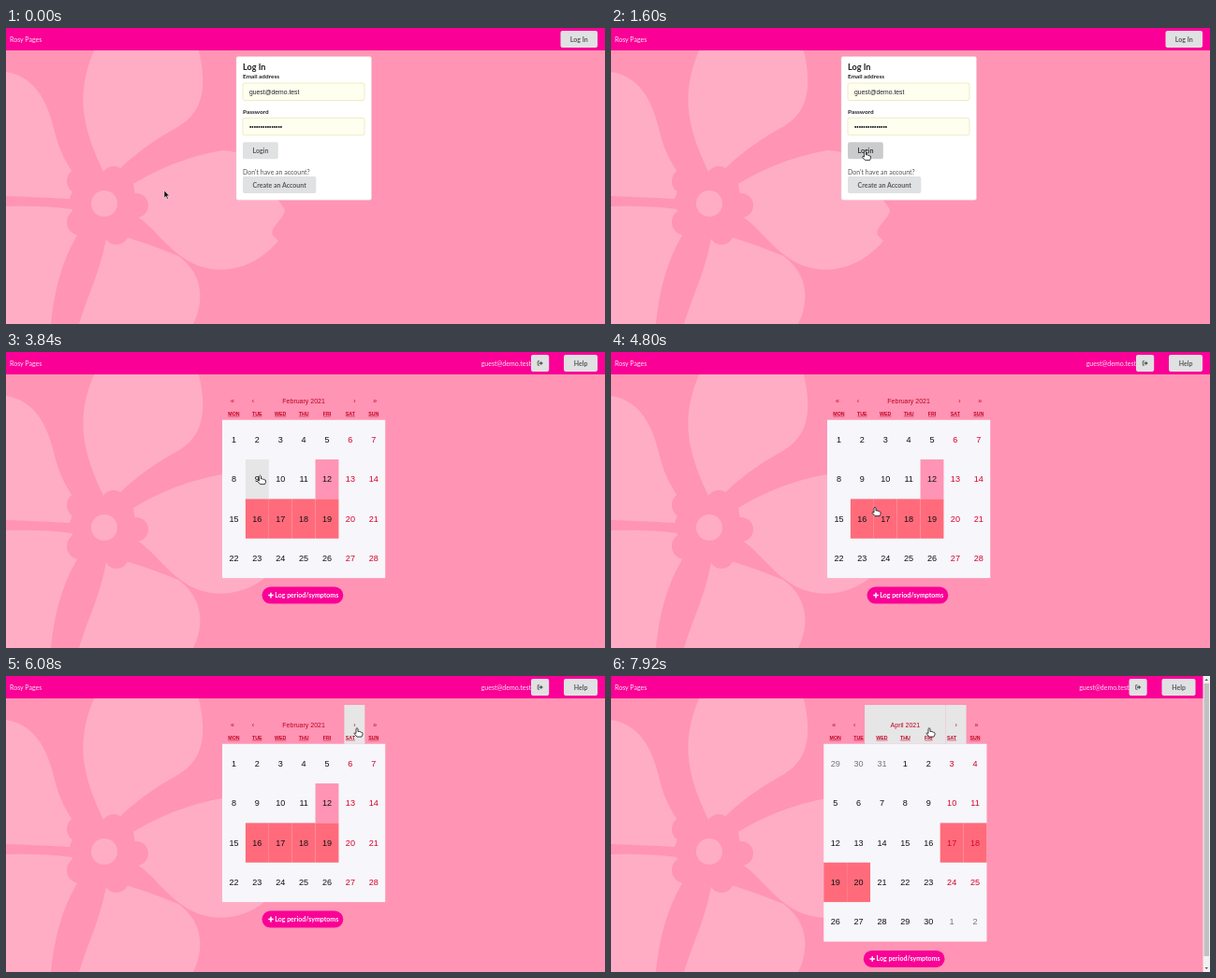
Write an HTML page that moves like this. It is 640x317 px and loops after 8000 ms.

```html
<!DOCTYPE html>
<html lang="en">
<head>
<meta charset="utf-8">
<title>Calendar login</title>
<style>
html, body { margin: 0; width: 100%; height: 100%; overflow: hidden; background: #ff94b4; }
svg { display: block; width: 640px; height: 317px; font: 7px Lato, sans-serif; }
.arial { font-family: "Liberation Sans", Arial, sans-serif; }
.bold { font-weight: 700; }
.mid { text-anchor: middle; }
.field { fill: #fffff0; stroke: #e5dfa1; stroke-width: .6; }
</style>
</head>
<body>
<svg viewBox="0 0 640 317">
  <g fill="#ffadc5">
    <path d="M105 156C86 115 70 75 96 20H205C218 72 206 94 180 108Q145 127 116 156Z"/>
    <path d="M0 47C34 52 46 84 53 115Q59 139 76 161L68 183Q30 181 0 180Z"/>
    <path d="M0 191Q40 190 70 194L82 213C63 240 52 275 48 317H0Z"/>
    <path d="M107 225C101 260 87 287 78 317H200C216 284 204 258 184 244Q155 232 122 222Z"/>
    <path d="M136 167Q180 140 231 131Q272 132 286 180Q297 190 298 196C295 206 281 215 285 222L291 228C262 262 222 266 194 249C173 237 159 215 142 203Z"/>
  </g>
  <g fill="#ff94b4">
    <circle cx="104" cy="188" r="31"/>
    <circle cx="115" cy="161" r="13"/><circle cx="79" cy="164" r="14"/>
    <circle cx="79" cy="208" r="14"/><circle cx="118" cy="219" r="13"/>
    <circle cx="139" cy="190" r="13"/>
  </g>
  <circle cx="105" cy="188" r="14" fill="#ffadc5"/>
  <rect width="640" height="24" fill="#fa0096"/>
  <text x="4" y="14.6" fill="#ffe6f4">Rosy Pages</text>
  <g id="scene"></g>
</svg>
<script>
const LOOP = 8000, STEP = 80, SHOW_CALENDAR = 3840, TO_MARCH = 6640, TO_APRIL = 7520;
const EMAIL = 'guest@demo.test', GREY = '#e0e1e2', PINK = '#fa0096', HOVER = '#e6e6e6';
const TILE_W = 24.89, TILE_H = 42.35, HEAD_RED = '#c00020';
const scene = document.getElementById('scene');

// Pointer tip: time, x, y
const route = [
  [800, 169, 174], [960, 196, 176], [1120, 242, 172], [1280, 265, 165],
  [1440, 270, 146], [1600, 271.5, 132],
  [4560, 271.5, 132], [4720, 275, 152], [4880, 289, 180], [5040, 315, 184],
  [5200, 340, 160], [5280, 344.5, 150], [5440, 355, 149.5],
  [5600, 362, 132], [5840, 372, 83], [6080, 375, 55.5],
  [7760, 375, 55.5], [7840, 355, 55], [7920, 340, 55.5]
];
const february = { name: 'February 2021', lead: 0, days: 28, rows: 4, hot: [15, 18], fertile: 11 };
const march = { name: 'March 2021', lead: 0, days: 31, rows: 5, hot: [17, 20] };
const april = { name: 'April 2021', lead: 3, days: 30, rows: 5, hot: [19, 22] };

const rect = (x, y, w, h, fill, r = 0, extra = '') =>
  `<rect x="${x}" y="${y}" width="${w}" height="${h}" rx="${r}" fill="${fill}" ${extra}/>`;
const text = (x, y, s, fill, cls = '', size = 7, extra = '') =>
  `<text x="${x}" y="${y}" fill="${fill}" class="${cls}" style="font-size:${size}px" ${extra}>${s}</text>`;
const path = (x, y, d, attrs) => `<path transform="translate(${x} ${y})" d="${d}" ${attrs}/>`;
const inside = (p, x, y, w, h) => p.x >= x && p.x < x + w && p.y >= y && p.y < y + h;
const button = (x, y, w, label, fill = GREY) =>
  rect(x, y, w, 18, fill, 2) + text(x + w / 2, y + 11.5, label, fill === GREY ? '#5a5a5b' : '#333', 'mid bold');

function pointerAt(t) {
  const i = route.findIndex(k => k[0] > t);
  if (i === 0) return { x: route[0][1], y: route[0][2] };
  const b = route[i < 0 ? route.length - 1 : i], a = i < 0 ? b : route[i - 1];
  const f = a === b ? 0 : (t - a[0]) / (b[0] - a[0]);
  return { x: a[1] + (b[1] - a[1]) * f, y: a[2] + (b[2] - a[2]) * f };
}

function pointer(p, hand) {
  return hand
    ? path(p.x, p.y, 'M-1 1Q0-.8 1 1V4Q2.4 3.3 3 4.3Q4.3 3.9 4.6 4.9Q6 4.7 6 6V7.4L5 9.6H0L-3 6.2Q-2.8 4.6-1 6Z',
        'fill="#fff" stroke="#111" stroke-width=".8"')
    : path(p.x, p.y, 'M0 0V8L1.9 6.3L3.2 9.2L4.4 8.6L3.1 5.8H5.6Z',
        'fill="#111" stroke="#fff" stroke-width=".5"');
}

function loginPage(t, p) {
  const onLogin = inside(p, 253, 122.3, 37.8, 18), onCreate = inside(p, 253, 159, 78.3, 18);
  const pressed = t >= 3360 && t < 3520;
  const field = y => rect(253, y, 130, 18.5, '#fffff0', 2, 'class="field"');
  return button(592.5, 3, 39.5, 'Log In') +
    rect(246, 30.5, 144.5, 153.7, '#fff', 2, 'stroke="#e3ccd5" stroke-width=".5"') +
    text(253, 44.7, 'Log In', '#222', 'bold', 9.1) +
    text(253, 54, 'Email address', '#222', 'bold', 6.45) + field(59) +
    text(260, 71.2, EMAIL, '#222', 'arial', 6.8) +
    text(253, 91.6, 'Password', '#222', 'bold', 6.45) + field(96.3) +
    text(260, 108.2, '•'.repeat(15), '#111', 'arial', 6.7) +
    button(253, 122.3, 37.8, 'Login', pressed ? '#babbbc' : onLogin ? '#cacbcd' : GREY) +
    text(253, 157, 'Don\'t have an account?', '#555') +
    button(253, 159, 78.3, 'Create an Account', onCreate ? '#cacbcd' : GREY) +
    pointer(p, onLogin || onCreate);
}

function calendar(month, left, p, nextFocused) {
  const { name, lead, days, rows, hot, fertile } = month;
  const nav = [['«', 0, 21.9], ['‹', 21.9, 21.9], [name, 43.8, 86.6], ['›', 130.4, 21.9], ['»', 152.3, 21.9]];
  let out = '';
  nav.forEach(([label, dx, w]) => {
    const x = left + dx;
    if (inside(p, x, 31, w, 41.7) || (label === '›' && nextFocused)) out += rect(x, 31, w, 41.7, HOVER);
    out += text(x + w / 2, 54.5, label, HEAD_RED, 'arial mid');
  });
  out += rect(left, 72.7, TILE_W * 7, TILE_H * rows, '#f6f6fb');
  ['MON', 'TUE', 'WED', 'THU', 'FRI', 'SAT', 'SUN'].forEach((day, i) =>
    out += text(left + TILE_W * (i + .5), 67.7, day, HEAD_RED, 'arial mid bold', 5.25, 'text-decoration="underline"'));
  for (let i = 0; i < rows * 7; i++) {
    const x = left + TILE_W * (i % 7), y = 72.7 + TILE_H * Math.floor(i / 7), n = i - lead + 1;
    const fill = i >= hot[0] && i <= hot[1] ? '#ff6b7b'
      : i === fertile ? '#ff94b4'
      : inside(p, x, y, TILE_W, TILE_H) ? HOVER : '';
    const other = n < 1 || n > days;
    const label = n < 1 ? n + 31 : n > days ? n - days : n;
    if (fill) out += rect(x, y, TILE_W, TILE_H, fill);
    out += text(x + TILE_W / 2, y + 24.3, label, other ? '#757575' : i % 7 > 4 ? '#d9002a' : '#111', 'arial mid', 9.1);
  }
  return out;
}

function calendarPage(t, p) {
  const month = t < TO_MARCH ? february : t < TO_APRIL ? march : april;
  const bar = t < TO_MARCH ? 0 : 7.5, left = 231 - bar / 2;
  const addX = 273.5 - bar / 2, addY = 82.2 + TILE_H * month.rows;
  let out = text(561 - bar, 14.6, EMAIL, '#ffe6f4', '', 7, 'text-anchor="end"') +
    rect(561 - bar, 3, 19.2, 18, GREY, 2) +
    path(570.8 - bar, 12, 'M-.7-2.2H-2.6V2.2H-.7', 'fill="none" stroke="#555" stroke-width=".9"') +
    path(570.8 - bar, 12, 'M-1.3-.7H.5V-2.3L3 0L.5 2.3V.7H-1.3Z', 'fill="#555"') +
    button(596 - bar, 3, 36, 'Help') +
    calendar(month, left, p, t >= TO_MARCH) +
    rect(addX, addY, 86.8, 18, PINK, 9) +
    path(addX + 9.5, addY + 9, 'M-2.8 0H2.8M0-2.8V2.8', 'stroke="#fff" stroke-width="1.5"') +
    text(addX + 13.8, addY + 11.4, 'Log period/symptoms', '#fff', 'bold');
  if (bar) {
    out += rect(632.5, 0, 7.5, 317, '#f1f1f1') + rect(633.5, 8, 5.5, 292, '#c1c1c1') +
      path(636.25, 4, 'M-1.8 1L0-1L1.8 1Z', 'fill="#555"') +
      path(636.25, 313, 'M-1.8-1L0 1L1.8-1Z', 'fill="#555"');
  }
  return out + pointer(p, true);
}

let last = -1;
function tick() {
  const t = Math.floor(performance.now() % LOOP / STEP) * STEP;
  if (t !== last) {
    last = t;
    scene.innerHTML = (t < SHOW_CALENDAR ? loginPage : calendarPage)(t, pointerAt(t));
  }
  requestAnimationFrame(tick);
}
tick();
</script>
</body>
</html>
```
